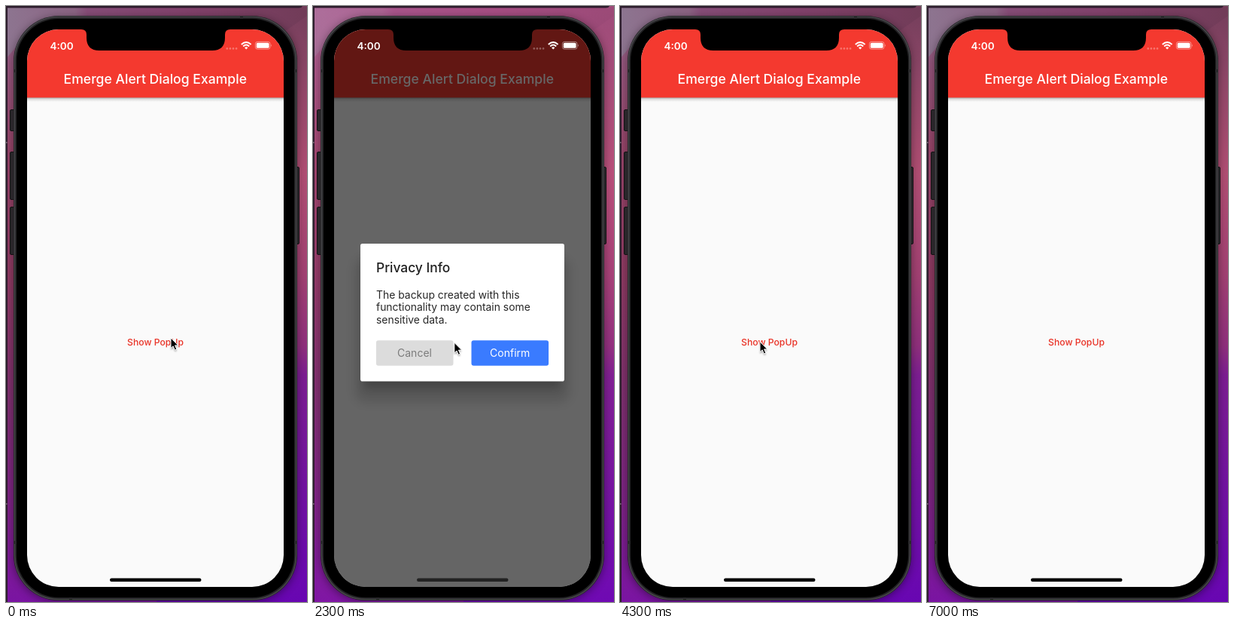
An HTML page for the animation above (7100 ms loop, 400 by 790 pixels).

```html
<!DOCTYPE html>
<html lang="en">
<head>
<meta charset="utf-8">
<title>Alert dialog demo</title>
<style>
html, body { margin: 0; width: 100%; height: 100%; overflow: hidden; background: #000; }
svg { display: block; width: 400px; height: 790px; }
text { font-family: Inter, "Noto Sans", sans-serif; }
.medium { font-weight: 500; }
.middle { text-anchor: middle; }
</style>
</head>
<body>
<svg viewBox="0 0 400 790" xmlns="http://www.w3.org/2000/svg">
  <defs>
    <linearGradient id="wallLeft" x2="0" y2="1">
      <stop offset="0" stop-color="#8b6f8c"/>
      <stop offset=".1" stop-color="#94557c"/>
      <stop offset=".25" stop-color="#964468"/>
      <stop offset=".45" stop-color="#8e3a62"/>
      <stop offset=".65" stop-color="#7e306e"/>
      <stop offset=".85" stop-color="#7c2286"/>
      <stop offset="1" stop-color="#7a14a2"/>
    </linearGradient>
    <linearGradient id="wallRight" x2="0" y2="1">
      <stop offset="0" stop-color="#733e5b"/>
      <stop offset=".12" stop-color="#8f4768"/>
      <stop offset=".28" stop-color="#b04e73"/>
      <stop offset=".45" stop-color="#a14172"/>
      <stop offset=".57" stop-color="#8f307c"/>
      <stop offset=".62" stop-color="#7c1e92"/>
      <stop offset=".8" stop-color="#7214a0"/>
      <stop offset="1" stop-color="#6806b2"/>
    </linearGradient>
    <linearGradient id="wallTop">
      <stop offset="0" stop-color="#8d7590"/>
      <stop offset=".23" stop-color="#8c6484"/>
      <stop offset=".27" stop-color="#874d78"/>
      <stop offset=".6" stop-color="#83426c"/>
      <stop offset="1" stop-color="#713c58"/>
    </linearGradient>
    <linearGradient id="glow" x2="0" y2="1">
      <stop offset="0" stop-color="#e864b0" stop-opacity=".36"/>
      <stop offset=".3" stop-color="#e05a9c" stop-opacity=".18"/>
      <stop offset=".6" stop-color="#d040b0" stop-opacity=".08"/>
      <stop offset="1" stop-color="#c030c0" stop-opacity=".08"/>
    </linearGradient>
    <linearGradient id="barShade" x2="0" y2="1">
      <stop offset="0" stop-color="#000" stop-opacity=".36"/>
      <stop offset=".4" stop-color="#000" stop-opacity=".12"/>
      <stop offset="1" stop-color="#000" stop-opacity="0"/>
    </linearGradient>
    <filter id="near" x="-20%" y="-20%" width="140%" height="150%"><feGaussianBlur stdDeviation="6"/></filter>
    <filter id="far" x="-30%" y="-30%" width="160%" height="170%"><feGaussianBlur stdDeviation="7"/></filter>
    <filter id="soft" x="-50%" y="-50%" width="200%" height="200%"><feGaussianBlur stdDeviation="1"/></filter>
    <clipPath id="screen"><rect x="28" y="31" width="341" height="739" rx="42"/></clipPath>
  </defs>

  <g id="wall">
    <rect width="200" height="790" fill="url(#wallLeft)"/>
    <rect x="200" width="200" height="790" fill="url(#wallRight)"/>
    <path d="M0 0H400V13L370 34H30L0 70Z" fill="url(#wallTop)"/>
    <rect id="tint" width="400" height="790" fill="url(#glow)"/>
    <rect x="10" y="15" width="377" height="775" rx="60" opacity=".4" filter="url(#near)"/>
    <path d="M0 0H394Q393 2.5 389 2.5H2V790H0Z" fill="#2c1c2c"/>
    <path d="M0 181H1.5M0 660H1.5" stroke="#b9a4b5"/>
  </g>

  <g id="body">
    <g fill="#29262a" stroke="#141214">
      <rect x="5.5" y="137.5" width="6" height="28" rx="1.5"/>
      <rect x="5.5" y="193.5" width="6" height="63" rx="1.5"/>
      <rect x="5.5" y="266.5" width="6" height="63" rx="1.5"/>
      <rect x="384.5" y="213.5" width="5" height="102" rx="1.5"/>
    </g>
    <rect x="10" y="13" width="377" height="775" rx="60" fill="#232325"/>
    <rect x="11.5" y="14.5" width="374" height="772" rx="58.5" fill="none" stroke="#454448" stroke-width="1.6"/>
    <rect x="14" y="17" width="369" height="767" rx="56" fill="#000"/>
    <path d="M10 86H14M383 86H387M10 711H14M383 711H387M313 13V17M86 784V788" stroke="#29292b" stroke-width="4"/>
  </g>

  <g clip-path="url(#screen)">
    <rect x="28" y="31" width="341" height="739" fill="#fafafa"/>
    <text class="medium middle" x="198.5" y="450" font-size="12.2" fill="#e93327">Show PopUp</text>
    <rect x="28" y="121" width="341" height="6" fill="url(#barShade)"/>
    <rect x="28" y="31" width="341" height="90.4" fill="#f4392f"/>
    <text class="medium middle" x="198.3" y="103" font-size="17.6" fill="#fff">Emerge Alert Dialog Example</text>
    <rect id="barrier" x="28" y="31" width="341" height="739"/>
    <g id="dialog">
      <rect x="56" y="335" width="285" height="190" rx="14" opacity=".13" filter="url(#far)"/>
      <rect x="68" y="326" width="261" height="180" rx="5" opacity=".22" filter="url(#near)"/>
      <rect x="63" y="315" width="271" height="182.5" rx="2.8" fill="#fff"/>
      <text class="medium" x="84" y="352.5" font-size="17.4" fill="#202020">Privacy Info</text>
      <g font-size="13.9" fill="#272727">
        <text x="84" y="388">The backup created with this</text>
        <text x="84" y="404.3">functionality may contain some</text>
        <text x="84" y="420.6">sensitive data.</text>
      </g>
      <rect x="83.9" y="443.3" width="102.6" height="33.4" rx="3" fill="#dcdcdc"/>
      <rect x="210.5" y="443.3" width="102.6" height="33.4" rx="3" fill="#3a7bff"/>
      <g class="middle" font-size="14">
        <text x="135" y="465.2" fill="#7c7c7c">Cancel</text>
        <text x="261.7" y="465.2" fill="#fff">Confirm</text>
      </g>
    </g>
    <rect id="home" x="138" y="758.5" width="121.5" height="4.5" rx="2.2"/>
  </g>

  <path d="M100 29V31Q107 31 107 38V42Q107 59 124 59H274Q291 59 291 42V38Q291 31 298 31V29Z"/>
  <g id="status" fill="#fff">
    <text x="58.5" y="57.5" font-size="13.5" font-weight="600">4:00</text>
    <g opacity=".3">
      <circle cx="293.8" cy="56.4" r="1.3"/><circle cx="297.9" cy="56.4" r="1.3"/>
      <circle cx="302" cy="56.4" r="1.3"/><circle cx="306.1" cy="56.4" r="1.3"/>
    </g>
    <g fill="none" stroke="#fff" stroke-width="2">
      <path d="M312.8 50.9Q319.2 45.1 325.6 50.9M315.2 53.4Q319.2 49.7 323.2 53.4"/>
    </g>
    <path d="M317 55.3Q319.2 53.4 321.4 55.3L319.2 57.6Z"/>
    <rect x="331.4" y="47.4" width="19.6" height="9.8" rx="2.8" fill="none" stroke="#fff" stroke-width=".9" opacity=".5"/>
    <rect x="332.8" y="48.8" width="16.8" height="7" rx="1.6"/>
    <path d="M352 50.6Q353.5 52.3 352 54Z" opacity=".6"/>
  </g>

  <g id="cursor">
    <path d="M0 2V16L3.2 13L5.6 18L8 17L5.8 12H10Z" opacity=".35" filter="url(#soft)"/>
    <path d="M0 0V13.6L3.1 10.8L5.4 16L7.8 15L5.6 9.9H9.8Z" stroke="#fff" stroke-width="1"/>
  </g>
</svg>
<script>
const LOOP = 7100, STEP = 100, FADE = 300;
const $ = id => document.getElementById(id);
const clamp = v => Math.max(0, Math.min(1, v));
const smooth = v => v * v * (3 - 2 * v);
const easeOut = v => 1 - (1 - v) ** 3;

// when the dialog starts to open and starts to close
const visits = [[200, 1100], [2000, 3300], [4400, 5800]];

// time, x, y of the pointer tip
const route = [
  [0, 219, 440], [200, 219, 440], [700, 177, 474], [1000, 158, 465],
  [1200, 158, 464], [1500, 166, 459], [1900, 185, 447], [2200, 188, 446],
  [2800, 186, 449], [3200, 163, 459], [3400, 162, 459], [3800, 170, 452],
  [4300, 186, 445], [4600, 186, 446], [5200, 172, 463], [5700, 160, 464],
  [6000, 160, 464], [6600, 410, 520], [7100, 410, 520]
];

function pointer(t) {
  const i = Math.max(1, route.findIndex(p => p[0] > t));
  const [a, b] = [route[i - 1], route[i]];
  const k = smooth(clamp((t - a[0]) / (b[0] - a[0])));
  return [a[1] + (b[1] - a[1]) * k, a[2] + (b[2] - a[2]) * k];
}

function openness(t) {
  const visit = visits.find(([from, to]) => t >= from && t < to + FADE);
  if (!visit) return 0;
  return clamp((t - visit[0]) / FADE) * (1 - clamp((t - visit[1]) / FADE));
}

function draw(time) {
  const t = Math.floor(time % LOOP / STEP) * STEP;
  const open = openness(t);
  const scale = easeOut(open);
  $("barrier").setAttribute("opacity", 0.595 * open);
  $("tint").setAttribute("opacity", open);
  $("home").setAttribute("fill", open > 0.5 ? "#222" : "#000");
  $("dialog").setAttribute("opacity", open);
  $("dialog").setAttribute("transform",
    `translate(198.5 406.3) scale(${scale}) translate(-198.5 -406.3)`);
  $("cursor").setAttribute("transform", `translate(${pointer(t)})`);
}

const start = performance.now();
function tick() {
  draw(performance.now() - start);
  requestAnimationFrame(tick);
}
tick();
</script>
</body>
</html>
```
